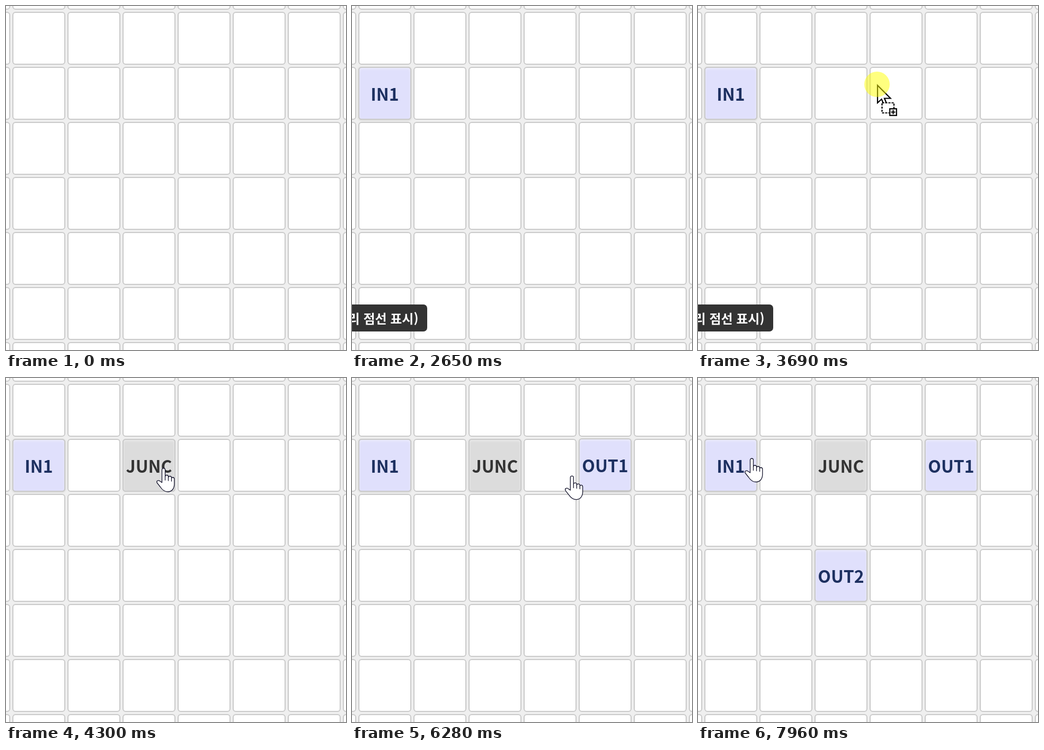
Recreate the animation shown at these times as an HTML page. Size 642 px wide and 650 px high, loop 7.99 s.

```html
<!DOCTYPE html>
<html lang="ko">
<head>
<meta charset="utf-8">
<title>Grid drag and drop</title>
<style>
  html, body { margin: 0; width: 100%; height: 100%; overflow: hidden; }
  body { position: relative; background: #efefef; font-family: "Noto Sans CJK KR", "Noto Sans KR", "Noto Sans CJK JP", "Noto Sans CJK", sans-serif; font-weight: 700; }
  .cell, .tile { position: absolute; box-sizing: border-box; width: 100px; height: 100px; border: 2px solid #cacaca; border-radius: 6px; }
  .cell { background: #fff; }
  .tile { background: #e0e0fc; color: #1d3060; font-size: 32px; line-height: 96px; text-align: center; white-space: nowrap; visibility: hidden; }
  .tile.gray { background: #dcdcdc; color: #333; }
  #toast { position: absolute; right: calc(100% - 141.5px); top: 564px; height: 51px; padding: 0 16px; border-radius: 7px; background: #333; color: #fff; font-size: 24px; line-height: 51px; white-space: nowrap; visibility: hidden; }
  svg { position: absolute; left: 0; top: 0; width: 100%; height: 100%; }
</style>
</head>
<body>
<div id="grid"></div>
<div id="toast">자리 점선 표시)</div>
<svg>
  <defs><path id="pointer" d="M0 0V33L7.6 26L12.8 38L18 36L13 24.5H24.5Z"/></defs>
  <g id="arrow"><use href="#pointer" fill="#fff" stroke="#14142c" stroke-width="1.3"/></g>
  <g id="drag">
    <g fill="#fff" stroke="#000" stroke-width="2.2">
      <use href="#pointer" x="1" y="2"/>
      <rect x="9.5" y="35" width="22.5" height="19" stroke-dasharray="4 2"/>
      <rect x="24.2" y="46.2" width="12.6" height="12.6"/>
      <path d="M30.5 48.5v8M26.5 52.5h8"/>
    </g>
    <circle r="24" fill="#ff0" opacity=".5"/>
  </g>
  <g id="hand" fill="#fff" stroke="#14142c" stroke-width="1.3" stroke-linejoin="round" stroke-linecap="round">
    <path d="M-3 27V3C-3-1 3-1 3 3V16C3 12 9 12 9 16V18C9 14 15 14 15 18V20C15 16 20.3 16.5 20.3 20.5V30C20.3 38 16 44.5 8 44.5C1 44.5-3 40-6 35.5L-12.3 27.5C-14 23.5-10 22-7 24.2Z"/>
    <path d="M3 16V22.5M9 18V23.5M15 20V24.5" fill="none"/>
  </g>
</svg>
<script>
const LOOP = 7990;
const $ = id => document.getElementById(id);
const clamp = v => Math.max(0, Math.min(1, v));
const ramp = (t, start, length) => clamp((t - start) / length);
const show = (el, on) => { el.style.visibility = on ? 'visible' : 'hidden'; };

function box(cls, col, row, text = '') {
  const el = document.createElement('div');
  el.className = cls;
  el.style.left = 12 + col * 104 + 'px';
  el.style.top = 11 + row * 104 + 'px';
  el.textContent = text;
  $('grid').append(el);
  return el;
}

for (let row = -1; row < 7; row++)
  for (let col = -1; col < 7; col++) box('cell', col, row);

// Each trip drags one tile in; a leg is a glide over a time span to a point.
const leg = (start, end, x, y) => ({ start, end, x, y });
const trips = [
  { tile: box('tile', 0, 1, 'IN1'), x: 0, y: 148, drop: 1670,
    legs: [leg(1130, 1190, 126, 169), leg(1330, 1440, 72, 167), leg(1700, 1950, -40, 238)] },
  { tile: box('tile gray', 2, 1, 'JUNC'), x: 32, y: 403, drop: 4240,
    legs: [leg(2960, 3490, 338, 148), leg(3860, 4080, 297.5, 170.5), leg(4370, 4590, -40, 212)] },
  { tile: box('tile', 4, 1, 'OUT1'), x: -22, y: 200, drop: 6110,
    legs: [leg(5570, 6050, 470, 171), leg(6150, 6470, -40, 193)] },
  { tile: box('tile', 2, 3, 'OUT2'), x: -20, y: 185, drop: 7530,
    legs: [leg(7040, 7450, 262, 362), leg(7580, 7960, 101.5, 152)] }
];

// Glides slow down at their goal, but speed up when they leave the stage.
function place(trip, t) {
  let { x, y } = trip;
  for (const to of trip.legs) {
    const k = ramp(t, to.start, to.end - to.start);
    const leaving = to.x < 0;
    x += (to.x - x) * (leaving ? k ** 2.5 : 1 - (1 - k) ** 2.8);
    y += (to.y - y) * (leaving ? k ** 0.5 : 1 - (1 - k) ** 1.9);
  }
  return `translate(${x.toFixed(2)} ${y.toFixed(2)})`;
}

function draw(t) {
  let kind = '', spot = '';
  for (const trip of trips) {
    const { tile, drop, legs } = trip;
    const last = legs[legs.length - 1];
    const lift = ramp(t, drop + 70, 100) * (1 - ramp(t, last.start + 120, 100));
    const depth = ramp(t, drop + 30, 100);
    show(tile, t >= drop);
    tile.style.transform = `translateY(${-lift}px)`;
    tile.style.boxShadow = `0 ${1 + lift}px 4px rgba(0,0,0,${0.12 * depth}), inset 0 2px 4px rgba(255,255,255,.45)`;

    if (t >= legs[0].start && (t < last.end || last.x > 0)) {
      kind = t < drop ? 'drag' : t < drop + 45 ? 'arrow' : 'hand';
      spot = place(trip, t);
    }
  }
  for (const id of ['arrow', 'drag', 'hand']) {
    show($(id), id === kind);
    $(id).setAttribute('transform', spot);
  }
  show($('toast'), t >= 2650 && t < 4150);
}

const start = performance.now();
function tick() {
  draw((performance.now() - start) % LOOP);
  requestAnimationFrame(tick);
}
tick();
</script>
</body>
</html>
```
